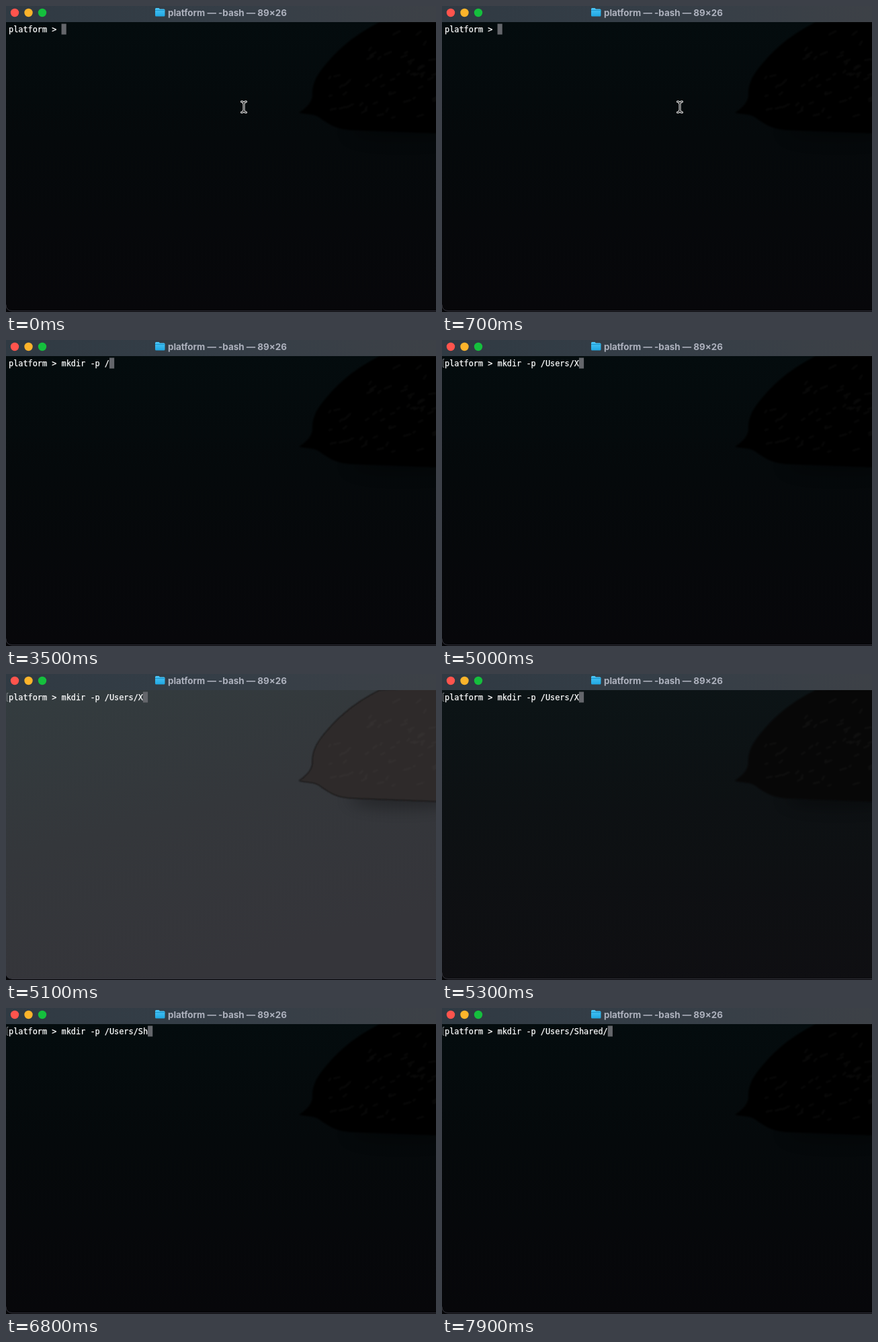
An HTML page that plays this animation: 640x456 px, repeating every 8 s.

```html
<!DOCTYPE html>
<html lang="en">
<head>
<meta charset="utf-8">
<title>Terminal</title>
<style>
  html, body { margin: 0; width: 100%; height: 100%; overflow: hidden; background: #000; }
  svg { display: block; width: 640px; height: 456px; }
  .title { font: 700 13.4px Inter, sans-serif; fill: #adb1bd; }
  .line { font: 11.86px "DejaVu Sans Mono", monospace; fill: #fff; stroke: #fff; stroke-width: .25px; white-space: pre; }
</style>
</head>
<body>
<svg viewBox="0 0 640 456">
  <defs>
    <linearGradient id="bar">
      <stop offset="0" stop-color="#303a43"/>
      <stop offset=".5" stop-color="#353e47"/>
      <stop offset="1" stop-color="#3d4147"/>
    </linearGradient>
    <linearGradient id="water" x2="0" y2="1">
      <stop offset="0" stop-color="#040c0e"/>
      <stop offset=".4" stop-color="#05090b"/>
      <stop offset="1" stop-color="#07070a"/>
    </linearGradient>
    <linearGradient id="lit" x2=".4" y2="1">
      <stop offset="0" stop-color="#333c3f"/>
      <stop offset=".5" stop-color="#34373b"/>
      <stop offset="1" stop-color="#35353a"/>
    </linearGradient>
    <linearGradient id="folder" x2="0" y2="1">
      <stop offset="0" stop-color="#4cc6f7"/>
      <stop offset="1" stop-color="#20a7e2"/>
    </linearGradient>
    <filter id="soft"><feGaussianBlur stdDeviation="1.2"/></filter>
    <filter id="haze" x="-50%" y="-150%" width="200%" height="400%"><feGaussianBlur stdDeviation="11"/></filter>
    <clipPath id="pane"><path d="M0 24H640V454H9Q0 454 0 445Z"/></clipPath>
    <path id="rock" d="M556 24C528 38 500 58 480 82C463 101 455 115 456 134C455 145 444 154 436 159C446 162 457 160 466 166C482 177 490 183 512 185L644 190V20Z"/>
    <path id="beam" d="M350.500 142.500Q354 142.500 354 146.500Q354 142.500 357.500 142.500M354 146V155M350.500 158.500Q354 158.500 354 154.500Q354 158.500 357.500 158.500"/>
  </defs>
  <rect width="640" height="456" fill="#050507"/>
  <g clip-path="url(#pane)">
    <rect y="24" width="640" height="430" fill="url(#water)"/>
    <rect id="flash" y="24" width="640" height="430" fill="url(#lit)"/>
    <ellipse cx="590" cy="186" rx="80" ry="14" fill="#020202" opacity=".3" filter="url(#haze)"/>
    <use href="#rock" fill="#020203" filter="url(#soft)"/>
    <use id="glow" href="#rock" fill="#2e2c2b" filter="url(#soft)"/>
    <path id="grain" fill="none" stroke="#80807a" stroke-width="2.500" opacity=".07" filter="url(#soft)"/>
  </g>
  <path d="M0 445Q0 454 9 454.500H640" fill="none" stroke="#36363f"/>
  <rect width="640" height="24" fill="url(#bar)"/>
  <circle cx="13" cy="10" r="6.200" fill="#ff544d"/>
  <circle cx="33.500" cy="10" r="6.200" fill="#fcb42b"/>
  <circle cx="54" cy="10" r="6.200" fill="#15bf3d"/>
  <path d="M222 4.500Q222 3 223.500 3H227.500L229 4.500H235Q236.500 4.500 236.500 6V14Q236.500 15.500 235 15.500H223.500Q222 15.500 222 14Z" fill="url(#folder)"/>
  <path d="M222 6.500H236.500" stroke="#1a94cb"/>
  <text class="title" x="241" y="14.500">platform — -bash — 89×26</text>
  <rect id="caret" y="26.500" width="7.200" height="16" fill="#64666b"/>
  <path id="mark" d="M3.500 28.500H1.500V40.500H3.500" fill="none" stroke="#7b7d82"/>
  <text id="line" class="line" x="4" y="38.500" xml:space="preserve"></text>
  <g id="pointer" fill="none" stroke-linecap="round">
    <use href="#beam" stroke="#f4f4f4" stroke-width="3"/>
    <use href="#beam" stroke="#111" stroke-width="1.100"/>
  </g>
</svg>
<script>
  const LOOP = 8000, COL = 7.14, PROMPT = 'platform > ';
  const $ = id => document.getElementById(id);

  // [time, command shown from then on]; Tab completes the folder names
  const typed = [
    [0, ''], [1200, 'm'], [1300, 'mk'], [1500, 'mkd'], [1600, 'mkdi'],
    [1700, 'mkdir'], [1900, 'mkdir '], [2400, 'mkdir -'], [2600, 'mkdir -p'],
    [2800, 'mkdir -p '], [3200, 'mkdir -p /'], [3600, 'mkdir -p /U'],
    [4000, 'mkdir -p /Users/'], [4700, 'mkdir -p /Users/X'],
    [5600, 'mkdir -p /Users/'], [5900, 'mkdir -p /Users/S'],
    [6400, 'mkdir -p /Users/Sh'], [6900, 'mkdir -p /Users/Shared/']
  ];

  // [time, brightness] of the visual bell
  const bell = [[0, 0], [5100, 1], [5200, 0.5], [5300, 0.17], [5400, 0.04], [5500, 0]];

  const at = (steps, t) => steps.filter(s => s[0] <= t).pop()[1];
  const show = (id, amount) => $(id).setAttribute('opacity', +amount);

  function addGrain() {
    let seed = 11, d = '';
    const rnd = () => (seed = seed * 16807 % 2147483647) / 2147483647;
    for (let i = 0; i < 55; i++) {
      const x = 480 + rnd() * 155, top = 40 + Math.max(0, 560 - x) * 0.85;
      const y = top + rnd() * (168 - top);
      d += `M${x} ${y}l${3 + rnd() * 9} ${-2 - rnd() * 5}`;
    }
    $('grain').setAttribute('d', d);
  }

  let last = '';
  function draw(now) {
    const t = now % LOOP;
    const text = PROMPT + at(typed, t);
    if (text !== last) {
      $('line').textContent = last = text;
      $('caret').setAttribute('x', 4 + text.length * COL);
    }
    const light = at(bell, t);
    show('flash', light);
    show('glow', light);
    show('mark', t >= 4000);
    show('pointer', t < 1200);
    requestAnimationFrame(draw);
  }

  addGrain();
  draw(performance.now());
</script>
</body>
</html>
```
